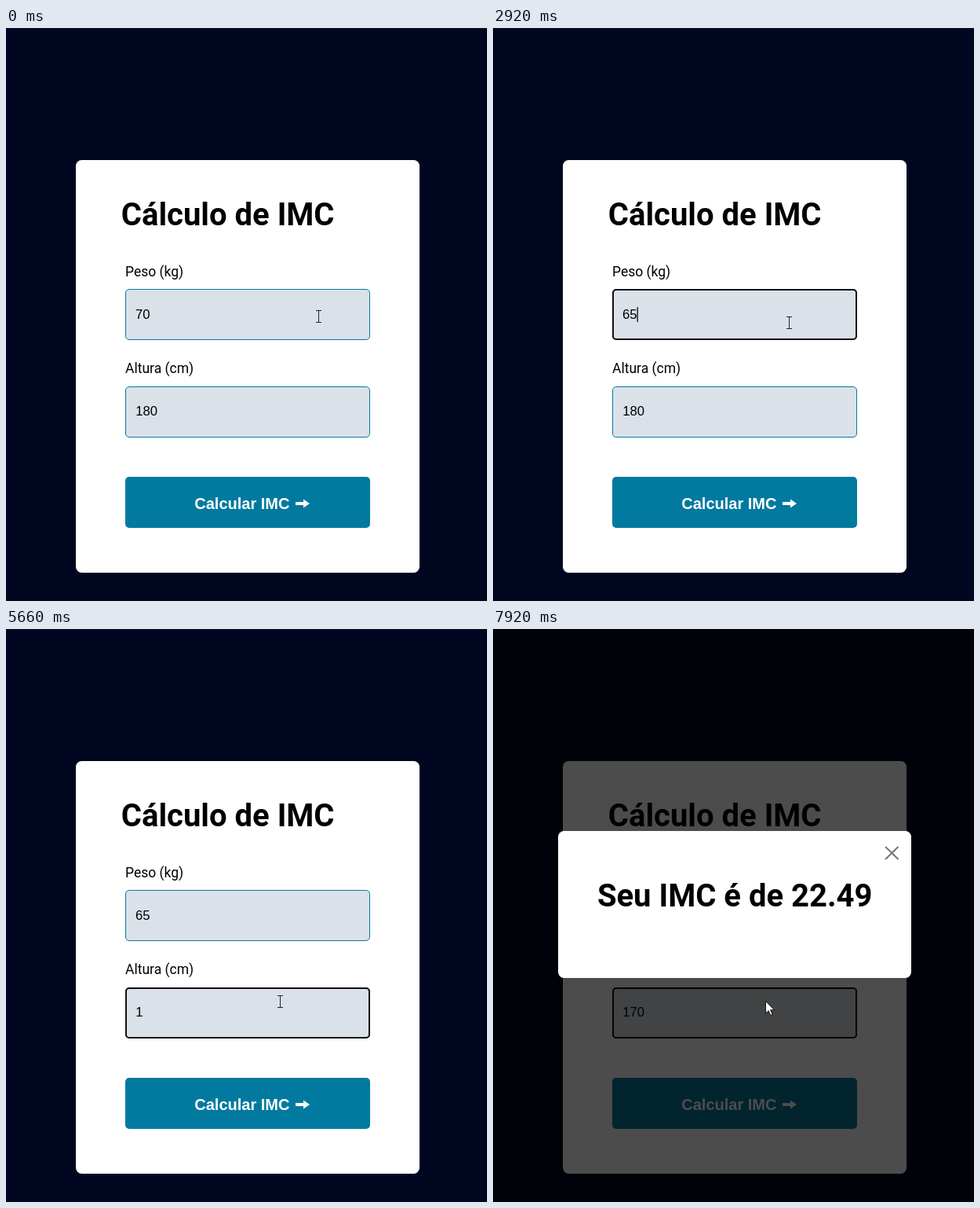
An HTML page for the animation above (8 s loop, 613 by 729 pixels).

```html
<!DOCTYPE html>
<html lang="pt">
<head>
<meta charset="utf-8">
<style>
  html, body { margin: 0; width: 100%; height: 100%; overflow: hidden; background: #010620; }
  svg { display: block; }
  .title { font: bold 40px Roboto, sans-serif; }
  .label { font: 17.5px Roboto, sans-serif; }
  .value { font: 16.67px "Liberation Sans", Arial, sans-serif; }
  .action { font: bold 20px "Liberation Sans", Arial, sans-serif; }
  .box { fill: #dbe1e9; stroke: #027a9f; }
  .focus { fill: none; stroke: #101014; stroke-width: 2; }
</style>
</head>
<body>
<svg width="613" height="729" viewBox="0 0 613 729">
  <rect width="613" height="729" fill="#010620"/>
  <rect width="613" height="1" fill="#0d1328"/>
  <rect x="89" y="168" width="438" height="525" rx="7.5" fill="#fff"/>
  <text class="title" x="146.8" y="251">Cálculo de IMC</text>

  <text class="label" x="152" y="316">Peso (kg)</text>
  <rect class="box" x="152.5" y="332.5" width="311" height="64" rx="4.5"/>
  <text class="value" id="weight" x="165" y="370"></text>

  <text class="label" x="152" y="439">Altura (cm)</text>
  <rect class="box" x="152.5" y="456.5" width="311" height="64" rx="4.5"/>
  <text class="value" id="height" x="165.2" y="493"></text>

  <rect class="focus" id="focus" x="153" width="310" height="63" rx="4"/>
  <rect id="caret" width="1.25" height="19"/>

  <rect x="152" y="571" width="312" height="65" rx="5" fill="#027a9f"/>
  <g fill="#fff">
    <text class="action" x="240.3" y="612">Calcular IMC</text>
    <path d="M369 603h10v-3.5l8 5.5-8 5.5v-3.5h-10z"/>
  </g>

  <g id="modal">
    <rect width="613" height="729" opacity=".7"/>
    <rect x="83" y="257" width="450" height="187" rx="7.5" fill="#fff"/>
    <text class="title" x="132.9" y="353">Seu IMC é de 22.49</text>
    <path d="M500 277l16.5 16M516.5 277l-16.5 16" stroke="#777" stroke-width="2"/>
  </g>

  <path id="beam" d="M-3-7.5H4M-3 7.5H4M.5-7V7" fill="none" stroke="#222"/>
  <path id="arrow" d="M.5.5V16l3.6-3.4 2.6 5.9 2.5-1.1-2.6-5.7h4.9z" fill="#fff" stroke="#111"/>
</svg>
<script>
const LOOP = 8000;
const el = id => document.getElementById(id);

// Each track lists [start time, ...values]; values hold until the next entry.
const weights = [[0, "70"], [1860, "7"], [2070, ""], [2790, "6"], [2920, "65"]];
const heights = [[0, "180"], [4790, "18"], [4990, "1"], [6130, "17"], [6330, "170"]];
const focusRows = [[0, null], [1070, 0], [3990, 1]];
const caretOn = [[1070, 1670], [2150, 2660], [2920, 3450], [3990, 4590],
                 [5140, 5660], [6130, 6860], [7400, 7920]];
const pointer = [
  [0, 398, 367, "beam"], [80, 392, 370, "beam"], [150, 386, 372, "beam"],
  [210, 383, 373, "beam"], [930, 377, 375, "beam"],
  [3530, 396, 405, "arrow"], [3600, 472, 530, "arrow"], [3680, 510, 593, "arrow"],
  [3760, 452, 543, "arrow"], [3850, 380, 490, "beam"], [3930, 351, 472, "beam"],
  [3990, 349, 474, "beam"], [7120, 347, 473, "arrow"]
];

const at = (track, t) => track.findLast(step => step[0] <= t).slice(1);
const show = (node, on) => node.setAttribute("visibility", on ? "visible" : "hidden");

function draw(t) {
  const texts = [at(weights, t)[0], at(heights, t)[0]];
  el("weight").textContent = texts[0];
  el("height").textContent = texts[1];

  const [row] = at(focusRows, t);
  const focused = row !== null;
  show(el("focus"), focused);
  show(el("caret"), focused && caretOn.some(([from, to]) => t >= from && t < to));
  if (focused) {
    el("focus").setAttribute("y", 333 + row * 124);
    el("caret").setAttribute("x", 165 + texts[row].length * 9.27);
    el("caret").setAttribute("y", 355 + row * 123);
  }

  show(el("modal"), t >= 7120);
  const [x, y, shape] = at(pointer, t);
  for (const id of ["beam", "arrow"]) {
    show(el(id), id === shape);
    el(id).setAttribute("transform", `translate(${x} ${y})`);
  }
}

const start = performance.now();
function tick() {
  draw((performance.now() - start) % LOOP);
  requestAnimationFrame(tick);
}
tick();
</script>
</body>
</html>
```
